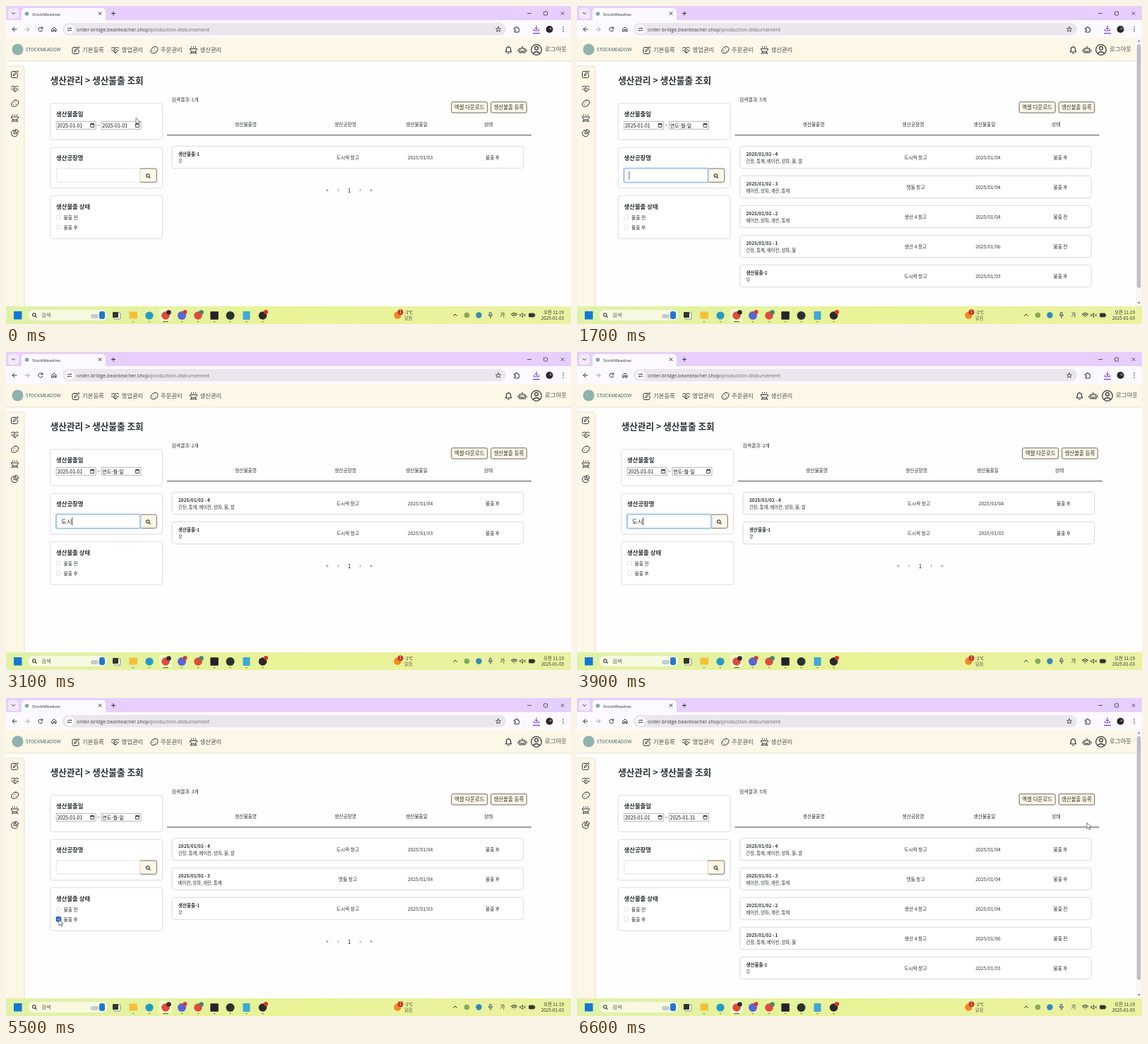
An HTML page with a canvas for the animation above (6700 ms loop, 800 px wide and 450 px high).

```html
<!DOCTYPE html>
<html lang="ko">
<head>
<meta charset="utf-8">
<style>
html, body { margin: 0; width: 100%; height: 100%; overflow: hidden; background: #fff; }
canvas { display: block; width: 800px; height: 450px; }
</style>
</head>
<body>
<canvas id="stage" width="800" height="450"></canvas>
<script>
const c = document.getElementById('stage').getContext('2d');
const LOOP = 6700;
const KR = '"Noto Sans CJK KR", "Noto Sans CJK JP", "Noto Sans CJK", sans-serif';
const UI = '"Open Sans", "Noto Sans", sans-serif';
const INK = '#2f3133', CREAM = '#fdf7e7';

// ---- drawing helpers ----
function text(s, x, y, size = 6.75, color = INK, weight = 400, align = 'left', family = KR) {
  c.font = `${weight} ${size}px ${family}`;
  c.fillStyle = color;
  c.textAlign = align;
  c.fillText(s, x, y);
}
const mid = (s, x, y, size, color, weight) => text(s, x, y, size, color, weight, 'center');
function box(x, y, w, h, fill, stroke, r = 0, lw = 0.8) {
  c.beginPath();
  c.roundRect(x, y, w, h, r);
  if (fill) { c.fillStyle = fill; c.fill(); }
  if (stroke) { c.strokeStyle = stroke; c.lineWidth = lw; c.stroke(); }
}
function dot(x, y, r, fill, stroke, lw = 1) {
  box(x - r, y - r, 2 * r, 2 * r, fill, stroke, r, lw);
}
function icon(d, x, y, stroke = INK, lw = 1, fill) {
  const p = new Path2D(d);
  c.save();
  c.translate(x, y);
  c.lineCap = c.lineJoin = 'round';
  if (fill) { c.fillStyle = fill; c.fill(p); }
  if (stroke) { c.strokeStyle = stroke; c.lineWidth = lw; c.stroke(p); }
  c.restore();
}
function shifted(dx, draw) {
  c.save();
  c.translate(dx, 0);
  draw();
  c.restore();
}

const PEN = 'M1-4H-3Q-5-4-5-2V3Q-5 5-3 5H2Q4 5 4 3V0M-2 2L-1-1L4-5L5-4L0 1Z';
const HANDS = 'M-5-3L-2-4L0-3L3-4L5-3M-5 0L-3 1L0 4L3 2L5 0M0-3L-2 0L0 .5L2-1L4 1M-1 2L1 3.5';
const COOKIE = 'M1-5Q-4-4-5 1Q-5 5 0 4Q5 3 5-2Q5-5 1-5M-2 1V1.2M0-2V-1.8M2 1V1.2';
const GRILL = 'M-5-2H5Q5 2 0 2Q-5 2-5-2M-3 2L-4 5M3 2L4 5M-3-5V-4M0-5V-4M3-5V-4M-3 4H3';
const PIE = 'M-1-4A4.5 4.5 0 1 0 4 1H-1ZM1-5V-1H5Q5-5 1-5';
const SEARCH = 'M2 0A2.2 2.2 0 1 1-2.4 0A2.2 2.2 0 1 1 2 0M1.5 1.6L3.2 3.3';
const DOWN = 'M-2-1L0 1L2-1';
const ARROW = 'M0 0V8L2 6.2L3.4 9.2L4.8 8.6L3.4 5.6H5.8Z';

// ---- timeline ----
const step = (list, t) => list.reduce((v, [at, next]) => t >= at ? next : v, list[0][1]);

const ROWS = [
  ['2025/01/02 - 4', '간장, 통깨, 베이컨, 양파, 물, 쌀', '도시락 창고', '2025/01/04', '불출 후'],
  ['2025/01/02 - 3', '베이컨, 양파, 계란, 통깨', '맷돌 창고', '2025/01/04', '불출 후'],
  ['2025/01/02 - 2', '베이컨, 양파, 계란, 통깨', '생산 4 창고', '2025/01/04', '불출 전'],
  ['2025/01/02 - 1', '간장, 통깨, 베이컨, 양파, 물', '생산 4 창고', '2025/01/06', '불출 전'],
  ['생산불출-1', '무', '도시락 창고', '2025/01/03', '불출 후']
];
const RESULTS = [[0, [4]], [1250, [0, 1, 2, 3, 4]], [2700, [0, 4]], [5050, [0, 1, 4]], [5650, [0, 1, 2, 3, 4]]];
const END_DATE = [[0, '2025-01-03'], [1200, '연도-월-일'], [6250, '2025-01-31']];
const TYPED = [[0, ''], [1900, 'ㄷ'], [2100, '도'], [2300, '도ㅅ'], [2500, '도시'],
  [4200, '도ㅅ'], [4300, '도'], [4400, 'ㄷ'], [4450, '']];
const FOCUS = [[0, false], [1500, true], [5050, false]];
const CHECKED = [[0, false], [5050, true], [5650, false]];
const PICKER = [[0, false], [400, true], [1200, false], [6000, true], [6250, false]];
const POINTER = [[0, 184, 159], [250, 186, 169], [450, 186, 169], [950, 158, 311], [1250, 158, 311],
  [1480, 110, 243], [4450, 190, 250], [4700, 105, 305], [5000, 75, 314], [5650, 75, 314],
  [5900, 181, 169], [6020, 181, 169], [6180, 217, 281], [6270, 217, 281], [6580, 722, 177]];

// ---- browser window ----
function browser() {
  box(0, 0, 800, 22, '#e6cfff');
  box(3, 3, 15, 15, '#f3e8fd', null, 4);
  icon(DOWN, 10.5, 10.5);
  box(22, 3, 119, 24, '#fdfaff', null, 5);
  dot(29.5, 11, 2.8, '#7fa9a5');
  text('StockMeadow', 37, 13.6, 6.1, INK, 400, 'left', UI);
  const cross = 'M-2-2L2 2M2-2L-2 2';
  icon(cross, 133, 10.5);
  icon('M-2.5 0H2.5M0-2.5V2.5', 152, 10.5);
  icon('M-2.5 0H2.5', 741, 10.5, INK, 0.8);
  box(761.5, 8, 5, 5, null, INK, 1, 0.8);
  icon(cross, 788, 10.5, INK, 0.8);

  box(0, 20, 800, 25, '#fdfaff');
  icon('M3 0H-3M0-3L-3 0L0 3', 12, 33);
  icon('M-3 0H3M0-3L3 0L0 3', 30, 33, '#a5a0a8');
  icon('M2.6-1.4A3 3 0 1 0 2.8 1M2.8-3.2V-1.2H.8', 49, 33);
  icon('M-3-.5L0-3L3-.5V3H1V.5H-1V3H-3Z', 68, 33);
  box(80, 24, 628, 17.5, '#ebe6ed', null, 8.7);
  dot(90, 33, 6.5, '#fff');
  icon('M-3-1.5H0M2.8-1.5H3M-3 1.5H-2.5M.5 1.5H3M2.2-1.5A.8 .8 0 1 1 .6-1.5A.8 .8 0 1 1 2.2-1.5M-.5 1.5A.8 .8 0 1 1-2.1 1.5A.8 .8 0 1 1-.5 1.5', 90, 33, INK, 0.8);
  const host = 'order-bridge.beanteacher.shop';
  text(host, 100, 35.6, 7, '#444148', 400, 'left', UI);
  text('/production-disbursement', 100 + c.measureText(host).width, 35.6, 7, '#706b75', 400, 'left', UI);
  icon('M0-3.5L1-1L3.5-1L1.6.6L2.3 3.2L0 1.8L-2.3 3.2L-1.6.6L-3.5-1L-1-1Z', 697, 33, INK, 0.8);
  icon('M-3-2H-1Q-1-4 0-4Q1-4 1-2H3V0Q4 0 4 1Q4 2 3 2V4H-3V2Q-1 2-1 1Q-1 0-3 0Z', 723, 33);
  icon('M0-4V1M-2-1L0 1L2-1M-3.5 1V3H3.5V1', 751, 32, '#7430c8');
  box(746, 38, 10, 1.2, '#7430c8');
  dot(769.5, 33, 5, '#292629');
  dot(771, 32, 1.7, '#8f6c67');
  for (const y of [30, 33, 36]) dot(789, y, 0.8, INK);
}

// ---- web page ----
function header(width, dx) {
  box(0, 45, width, 33, CREAM);
  box(0, 77.6, width, 0.8, '#e6e0d0');
  dot(16.5, 61.5, 8, '#8fb3ad');
  text('STOCKMEADOW', 28, 63.9, 6.5, '#3b5b5b', 400, 'left', UI);
  [['기본등록', PEN, 99], ['영업관리', HANDS, 154.5], ['주문관리', COOKIE, 210], ['생산관리', GRILL, 265.5]]
    .forEach(([label, d, x]) => {
      icon(d, x, 62.5);
      text(label, x + 9, 65.3, 8.4, '#505050');
    });
  shifted(dx, () => {
    icon('M-4 3Q-3 2-3-1Q-3-4 0-4Q3-4 3-1Q3 2 4 3ZM-1 5H1M0-5V-4', 711.5, 62, INK, 1.2);
    icon('M-4-2H4V4H-4ZM0-2V-5M-6 0V2M6 0V2M-2 0V.6M2 0V.6M-2 2.5H2', 731, 62, INK, 1.1);
    dot(751, 62, 7.3, null, INK, 1.2);
    dot(751, 59.7, 2.4, null, INK, 1.2);
    icon('M-4.5 2.5Q0-2 4.5 2.5', 751, 64.5, INK, 1.2);
    text('로그아웃', 763, 63.5, 8.4, '#505050');
  });
}

function sidebar() {
  box(-5, 85, 31, 345, CREAM, '#e3d9bd', 4);
  [PEN, HANDS, COOKIE, GRILL, PIE].forEach((d, i) => icon(d, 12.5, 96.5 + 20.8 * i));
}

function dateField(x, value) {
  box(x, 163.3, 56, 11, '#fff', '#85858a', 0, 0.6);
  text(value, x + 1.3, 171.5, 6.95, '#111');
  box(x + 48.5, 166.7, 5, 4.8, null, '#222', 0.4, 0.8);
  box(x + 48.5, 166.2, 5, 1.6, '#222');
}

function checkbox(y, on, label) {
  if (on) {
    box(70.2, y - 4.3, 8.6, 8.6, '#a9c9f7', null, 2);
    box(71.5, y - 3, 6, 6, '#1d62c9', '#123f8c', 1);
    icon('M-1.7 0L-.4 1.3L2-1.5', 74.5, y, '#fff', 0.9);
  } else box(71.5, y - 3, 6, 6, '#fff', '#dcdce0', 1);
  text(label, 81.5, y + 2.5);
}

function filters(t) {
  const typed = step(TYPED, t), focus = step(FOCUS, t);
  for (const [y, h] of [[137.7, 51.5], [200.3, 57.5], [268.3, 61]]) box(62.7, y, 159, h, '#fff', '#d3d3d8', 3);
  text('생산불출일', 71, 155.8, 8.4, INK, 700);
  dateField(71.2, '2025-01-01');
  text('~', 131, 171.3, 6.9, INK, 400, 'center');
  dateField(135, step(END_DATE, t));

  text('생산공장명', 71, 218.2, 8.4, INK, 700);
  box(189.3, 230, 24, 19.3, CREAM, '#4b4942', 2.5);
  icon(SEARCH, 201, 240, INK, 1.1);
  if (focus) box(69.6, 228.4, 121.9, 22.4, '#bcd6fb', null, 3);
  box(71.3, 230, 118.5, 19.3, '#fff', focus ? '#7ba6df' : '#dedee2', 2);
  text(typed, 78, 243, 8.4);
  if (focus) box(78 + c.measureText(typed).width, 234, 0.8, 11.5, '#333');

  text('생산불출 상태', 71, 286.8, 8.4, INK, 700);
  checkbox(299, false, '불출 전');
  checkbox(313, step(CHECKED, t), '불출 후');
}

function results(list) {
  text(`검색결과: ${list.length}개`, 234.5, 135);
  [['엑셀 다운로드', 630.7, 51], ['생산불출 등록', 686.7, 50.5]].forEach(([label, x, w]) => {
    box(x, 135.8, w, 15.3, CREAM, '#45433d', 2);
    mid(label, x + w / 2, 146.2, 7.5, INK, 500);
  });
  [['생산불출명', 339.5], ['생산공장명', 480.5], ['생산불출일', 581.5], ['상태', 683]]
    .forEach(([label, x]) => mid(label, x, 169.5));
  box(228, 182.3, 516, 0.9, '#444');
  list.forEach((n, i) => {
    const [name, parts, place, date, status] = ROWS[n], y = 198.3 + 42 * i;
    box(235.2, y, 497.5, 31.4, '#fff', '#cfcfd6', 4);
    text(name, 244, y + 13.6, 6.5, INK, 700);
    text(parts, 244, y + 23.4, 6.3);
    mid(place, 484, y + 18.5);
    mid(date, 586.5, y + 18.5);
    mid(status, 689, y + 18.5);
  });
  if (list.length < 5) {
    const y = 221.3 + 42 * list.length;
    ['«', '‹', '1', '›', '»'].forEach((s, i) =>
      mid(s, 455 + 15.5 * i, y + (i === 2 ? 0.5 : 0), 8.2, i === 2 ? '#222' : '#55555a'));
  }
}

function picker(deleting) {
  c.save();
  c.shadowColor = 'rgba(0,0,0,.4)';
  c.shadowBlur = 18;
  c.shadowOffsetY = 7;
  box(136, 175.3, 112, 145, '#fff', null, 3);
  c.restore();
  box(136, 175.3, 112, 145, null, '#c4c4c8', 3, 0.6);
  text('2025년 01월', 141, 189.2, 6.4, '#111', 700);
  icon('M-2-1H2L0 1.2Z', 180, 187, null, 0, INK);
  icon('M0 4V-4M-3.5-.5L0-4L3.5-.5', 219, 187, INK, 0.9);
  icon('M0-4V4M-3.5.5L0 4L3.5.5', 235.7, 187, INK, 0.9);
  [...'일월화수목금토'].forEach((d, i) => mid(d, 148.5 + 14.55 * i, 208, 6.5));
  for (let i = 0; i < 42; i++) {
    const day = new Date(2024, 11, 29 + i), n = day.getDate(), inMonth = day.getMonth() === 0;
    const x = 148.5 + 14.55 * (i % 7), y = 220.7 + 14.55 * Math.floor(i / 7), chosen = inMonth && n === 3;
    if (chosen) box(x - 7.2, y - 7.2, 14.4, 14.4, '#1868cf', '#14335f', 1, 1.1);
    mid(n, x, y + 2.4, 7, chosen ? '#fff' : inMonth ? '#222' : '#8a8a8e', chosen ? 700 : 400);
  }
  if (deleting) box(146.3, 304.3, 13.4, 10.6, '#a9d1f5', '#333', 0.5);
  mid('삭제', 153, 312.3, 6.6, '#1a73c8');
  mid('오늘', 231, 312.8, 6.6, '#1a73c8');
}

function scrollbar() {
  box(791, 45, 9, 380, '#f7f7f8');
  box(792.8, 54, 5.4, 345, '#bfbfc2', null, 2.7);
  icon('M-2 1L0-1.5L2 1Z', 795.6, 49.5, null, 0, '#777');
  icon('M-2-1L0 1.5L2-1Z', 795.6, 420, null, 0, '#777');
}

// ---- taskbar ----
function taskbar() {
  const g = c.createLinearGradient(0, 0, 800, 0);
  g.addColorStop(0, '#e0f2a8');
  g.addColorStop(0.5, '#e9f396');
  g.addColorStop(1, '#eaf1a2');
  box(0, 425, 800, 25, g);
  box(11, 432, 11.5, 11.5, '#1279d4');
  box(31, 429.5, 113, 16, '#f7fae0', '#dbe3b4', 8, 0.6);
  icon(SEARCH, 40, 437, INK, 1.1);
  text('검색', 50, 440, 7.4, '#5a5c50');
  box(120, 436, 11, 6, '#c4ccd0', null, 3);
  box(132, 432, 8, 11, '#2476cc', null, 3);
  box(153, 434, 9, 9, '#f6f6f0', '#777', 1);
  box(151, 433, 8, 8, '#333', null, 1);
  box(217, 428.5, 18, 18, '#f1f7c8', null, 3);

  box(174.5, 432.5, 11.5, 10, '#f5bf3b', null, 1);
  dot(203, 438, 5.6, '#259bc4');
  dot(226, 438, 5.8, '#e04b3b');
  dot(249, 438, 6, '#5865d8');
  dot(272, 438, 5.8, '#e04b3b');
  box(289.3, 432.3, 11.5, 11.5, '#24212b', null, 1);
  dot(317.5, 438, 6, '#28312f');
  box(335.5, 432, 10, 12, '#3ca9d6', null, 1);
  dot(363.5, 438, 5.8, '#2b292b');
  dot(230.5, 433.5, 3.3, '#302b2c');
  dot(253.5, 433, 3, '#d83b32');
  dot(276.5, 433.5, 3.3, '#4c8371');
  dot(368, 433, 3, '#e02c28');
  [180, 203, 226, 249, 272, 295, 317.5, 340.5, 363.5].forEach((x, i) =>
    box(x - (i === 2 ? 4 : 1.5), 446, i === 2 ? 8 : 3, 1.2, i === 2 ? '#5d7c28' : '#8c9270', null, 0.6));

  dot(554.5, 437.5, 5.2, '#f08a24');
  dot(558.5, 433.2, 3.9, '#c92f2a');
  mid('1', 558.5, 435.2, 5.5, '#fff');
  text('-2°C', 564, 436.2, 6.3);
  text('맑음', 564, 444.4, 6.3, '#66684f');

  icon('M-2.5 1L0-1.5L2.5 1', 636, 437.5);
  dot(652.5, 437.5, 3.8, '#86a958');
  dot(669.5, 437.5, 4.2, '#3486bf');
  icon('M-1-4H1V0H-1ZM-2.5-1Q-2.5 2 0 2Q2.5 2 2.5-1M0 2V4', 686, 437.5, '#3b527d', 0.9);
  mid('가', 703, 440.2, 7.6);
  icon('M-4-1Q0-5 4-1M-2.5 .8Q0-2 2.5 .8M0 2.4V2.6', 719.5, 437.5, INK, 1.1);
  icon('M-4-1H-2.5L-.5-3V3L-2.5 1H-4ZM1-1.5L4 1.5M4-1.5L1 1.5', 732, 437.5, INK, 0.8);
  box(740.5, 435, 7.5, 5, '#333', INK, 1);
  box(748.3, 436.3, 1, 2.4, INK);
  text('오전 11:19', 790, 436.2, 6.3, INK, 400, 'right');
  text('2025-01-03', 790, 444.4, 6.3, INK, 400, 'right');
}

function pointer(t) {
  if (t >= 1480 && t < 4450) return; // hidden while typing
  const i = POINTER.findLastIndex(p => t >= p[0]);
  const a = POINTER[i], b = POINTER[i + 1] || a;
  const k = b === a ? 0 : (t - a[0]) / (b[0] - a[0]), e = k * k * (3 - 2 * k);
  icon(ARROW, a[1] + (b[1] - a[1]) * e, a[2] + (b[2] - a[2]) * e, '#555', 0.8, '#fff');
}

function draw(t) {
  const list = step(RESULTS, t), tall = list.length === 5;
  box(0, 0, 800, 450, '#fefefe');
  header(800, tall ? -9 : 0);
  sidebar();
  shifted(tall ? -4.5 : 0, () => {
    text('생산관리 > 생산불출 조회', 62.7, 110, 12.6, INK, 700);
    filters(t);
    results(list);
    if (step(PICKER, t)) picker(t > 900 && t < 1200);
  });
  if (tall) scrollbar();
  browser();
  taskbar();
  pointer(t);
}

const start = performance.now();
function tick() {
  draw((performance.now() - start) % LOOP);
  requestAnimationFrame(tick);
}
tick();
</script>
</body>
</html>
```
